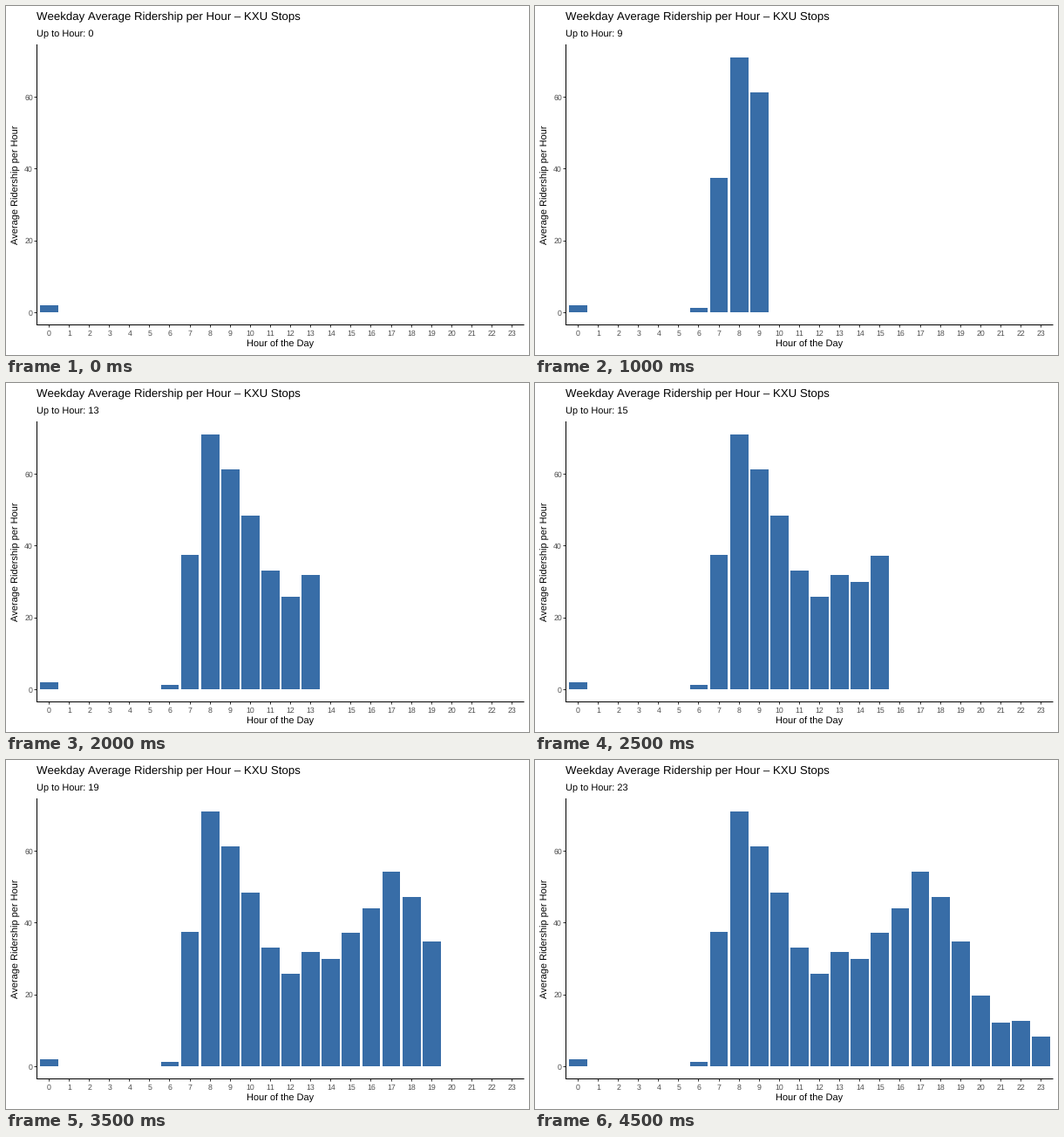
A matplotlib script for the animation above (4750 ms loop, 600 by 400 pixels).

```python
import math

import matplotlib.pyplot as plt
from matplotlib.animation import FuncAnimation
from matplotlib.patches import Rectangle

plt.rcParams.update({
    "font.family": "Liberation Sans",
    "text.hinting": "none",
    "text.kerning_factor": 8,  # practically no kerning
    "toolbar": "None",
})

W, H, DPI = 600, 400, 100
LEFT, RIGHT, TOP, BOTTOM = 35.5, 594.5, 44, 365.5
STEP = (RIGHT - LEFT) / 24.2
ZERO_Y, UNIT = 351.4, 4.11
BAR_COLOR = "#386DA7"

RIDERSHIP = {
    0: 2.0, 6: 1.3, 7: 37.6, 8: 71.2, 9: 61.4, 10: 48.5, 11: 33.2,
    12: 25.9, 13: 32.0, 14: 30.0, 15: 37.3, 16: 44.1, 17: 54.4,
    18: 47.3, 19: 34.9, 20: 19.8, 21: 12.2, 22: 12.7, 23: 8.4,
}
HOURS = list(RIDERSHIP)

fig = plt.figure(figsize=(W / DPI, H / DPI), dpi=DPI, facecolor="white")
ax = fig.add_axes([0, 0, 1, 1])
ax.set(xlim=(0, W), ylim=(H, 0))
ax.axis("off")


def hour_x(hour):
    return LEFT + (0.6 + hour) * STEP


def value_y(value):
    return ZERO_Y - value * UNIT


def pixel_center(v):
    return math.floor(v) + 0.5


def label(x, y, text, px, color="black", ha="center", **kw):
    """Text with its baseline at y and its size in pixels."""
    return ax.text(x, y, text, fontsize=px * 72 / DPI, color=color,
                   ha=ha, va="baseline", **kw)


def line(xs, ys, color):
    """One pixel wide line; snapping is off, so give pixel centres."""
    ax.plot(xs, ys, color=color, lw=72 / DPI,
            solid_capstyle="butt", snap=False)


def make_bar(hour):
    x0 = round(hour_x(hour) - 0.45 * STEP)
    x1 = round(hour_x(hour) + 0.45 * STEP)
    y0, y1 = round(value_y(RIDERSHIP[hour])), round(ZERO_Y)
    return ax.add_patch(Rectangle((x0, y0), x1 - x0, y1 - y0,
                                  fc=BAR_COLOR, lw=0))


bars = [make_bar(hour) for hour in HOURS]

for hour in range(24):
    x = pixel_center(hour_x(hour))
    line([x, x], [BOTTOM, BOTTOM + 3], "#333333")
    label(hour_x(hour), 378, str(hour), 8.8, "#4D4D4D")

for value in range(0, 61, 20):
    y = pixel_center(value_y(value))
    line([LEFT - 3, LEFT], [y, y], "#333333")
    label(31, value_y(value) + 3.2, str(value), 8.8, "#4D4D4D", ha="right")

line([LEFT, LEFT], [TOP, BOTTOM + 0.5], "black")
line([LEFT - 0.5, RIGHT], [BOTTOM, BOTTOM], "black")

label(35, 16, "Weekday Average Ridership per Hour – KXU Stops", 13.2, ha="left")
subtitle = label(35, 35, "", 11, ha="left")
label((LEFT + RIGHT) / 2, 391, "Hour of the Day", 11)
label(14.5, (TOP + BOTTOM) / 2, "Average Ridership per Hour", 11,
      rotation=90, rotation_mode="anchor")


def update(frame):
    for i, bar in enumerate(bars):
        bar.set_visible(i <= frame)
    subtitle.set_text(f"Up to Hour: {HOURS[frame]}")
    return [*bars, subtitle]


anim = FuncAnimation(fig, update, frames=len(HOURS), interval=250,
                     repeat=True, repeat_delay=0, blit=False)

plt.show()
```
